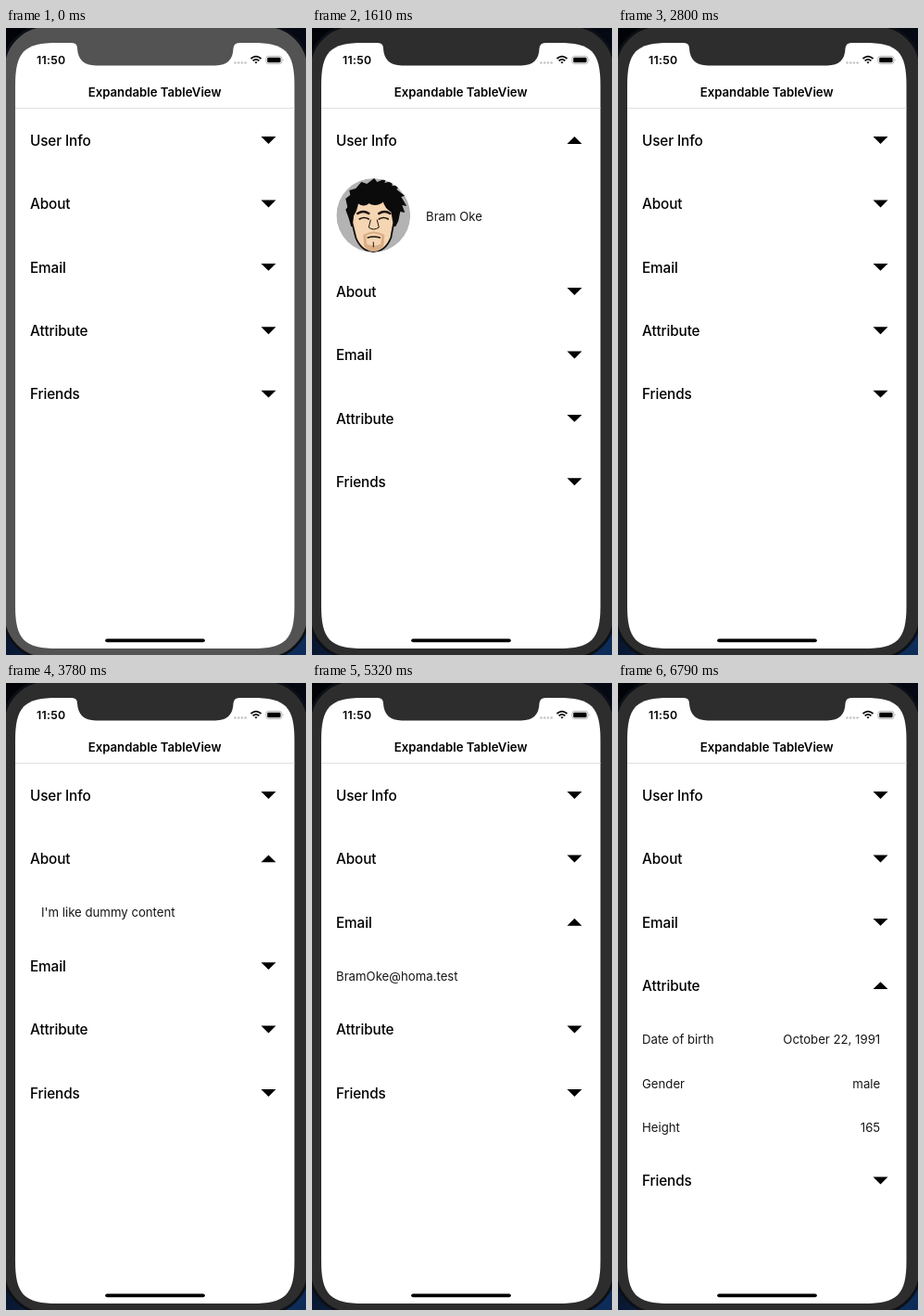
Recreate the animation shown at these times as an HTML page. Size 324 by 676 pixels, loop 7420 ms.

```html
<!DOCTYPE html>
<html lang="en">
<head>
<meta charset="utf-8">
<title>Expandable TableView</title>
<style>
  html, body { margin: 0; width: 100%; height: 100%; overflow: hidden; background: #05060d; }
  svg { display: block; }
  text { font-family: Inter, Roboto, sans-serif; }
  .header { font-size: 15.3px; font-weight: 500; letter-spacing: -.007em; }
  .detail, .title { font-size: 13.2px; }
  .detail { fill: #161616; }
  .title { font-weight: 600; text-anchor: middle; }
  .time { font-size: 12.3px; font-weight: 600; letter-spacing: .025em; }
  .end { text-anchor: end; }
</style>
</head>
<body>
<svg width="324" height="676" viewBox="0 0 324 676">
  <defs>
    <linearGradient id="desk" x2=".4" y2="1">
      <stop stop-color="#020307"/>
      <stop offset=".8" stop-color="#071022"/>
      <stop offset="1" stop-color="#0d2c58"/>
    </linearGradient>
    <clipPath id="round"><circle r="40"/></clipPath>
  </defs>
  <rect width="324" height="676" fill="url(#desk)"/>
  <g id="bezel">
    <rect x="-3" y="-3" width="330" height="683" rx="48" stroke="#0c0f16" stroke-width="3"/>
    <path fill="#fff" d="M10 62C10 25.5 19.5 16 56 16H265.5C302 16 311.5 25.5 311.5 62
      V623C311.5 659.5 302 669 265.5 669H56C19.5 669 10 659.5 10 623Z"/>
    <path d="M71 15.5V16Q77 16 77 22Q78 40.4 97 40.4H226Q245 40.4 245.5 22Q246 16 252 16V15.5Z"/>
  </g>

  <text class="time" x="33" y="38.8">11:50</text>
  <g fill="#c4c4c4">
    <circle cx="247.5" cy="37.5" r="1.3"/><circle cx="251.2" cy="37.5" r="1.3"/>
    <circle cx="254.9" cy="37.5" r="1.3"/><circle cx="258.6" cy="37.5" r="1.3"/>
  </g>
  <g fill="none" stroke="#000" stroke-width="1.7">
    <path d="M264.5 33Q270 28.2 275.5 33M266.6 35.3Q270 32.3 273.4 35.3"/>
    <path d="M268.4 36.8Q270 35.6 271.6 36.8L270 38.5Z" fill="#000" stroke="none"/>
  </g>
  <rect x="280.9" y="30.4" width="17" height="8.2" rx="2.4" fill="none" stroke="#a5a5a5" stroke-width=".8"/>
  <rect x="282.2" y="31.7" width="14.4" height="5.6" rx="1.3"/>
  <path d="M298.9 33.1Q300.4 34.5 298.9 35.9Z" fill="#a5a5a5"/>

  <text class="title" x="160.6" y="73.9">Expandable TableView</text>
  <path d="M10 86.5H311.5" stroke="#e0e0e0"/>
  <g id="table"></g>
  <rect x="107.2" y="658.4" width="107.6" height="3.9" rx="1.95"/>
</svg>
<script>
const LOOP = 7420, STEP = 70, SLIDE = 300;
const FIRST = 121, PITCH = 68.4, ROW = 47.3;

const detail = (x, y, text, end = "") =>
  `<text class="detail ${end}" x="${x}" y="${y + 5.2}">${text}</text>`;

const avatar = `
  <g transform="translate(66.3 ${ROW - .5})" clip-path="url(#round)">
    <circle r="40" fill="#b3b3b3"/>
    <path fill="#0b0b0b" d="M-24 12L-27 2L-30-6L-28-9L-30-18L-25-22L-26-27L-19-29L-13-36L-7-34L1-40
      L4-36L14-40L12-35L21-37L20-32L29-32L25-28L34-21L30-20L36-10L31-11L34-3L29-4L27 6L24 12Z"/>
    <path fill="#f5d5b2" stroke="#0b0b0b" stroke-width="1.8" d="M-22 0Q-18-6-17-14Q-10-9-5-14Q3-9 11-16
      Q13-8 20-4L22 8L19 24Q13 39 0 39Q-13 39-19 24L-23 8Z"/>
    <path fill="#d9ae86" d="M-11 21Q0 14 12 21L11 33Q7 39 0 39Q-7 39-10 33Z"/>
    <path fill="#f5d5b2" d="M-8 22Q0 17 9 22L8 31Q0 34-7 31Z"/>
    <g fill="none" stroke="#1c120d" stroke-linecap="round">
      <path stroke-width="2.6" d="M-17-2Q-11-6-5-2M6-2Q12-6 18-2"/>
      <path stroke-width="1.6" d="M-15 4Q-10 1-5 4M6 4Q11 1 16 4M-6 24Q0 22 7 24"/>
      <path d="M-3 5L-5 13Q0 17 6 13L4 5M0 29V34"/>
    </g>
  </g>`;

// Each section opens and, where "close" is given, closes again.
const sections = [
  { name: "User Info", rows: 2, open: 1290, close: 2340,
    content: avatar + detail(123, ROW, "Bram Oke") },
  { name: "About", rows: 1, open: 3460, close: 4230,
    content: detail(38, ROW / 2, "I'm like dummy content") },
  { name: "Email", rows: 1, open: 5000, close: 5770,
    content: detail(26, ROW / 2, "BramOke@homa.test") },
  { name: "Attribute", rows: 3, open: 6470,
    content: [["Date of birth", "October 22, 1991"], ["Gender", "male"], ["Height", "165"]]
      .map(([key, value], i) => {
        const y = ROW * (i + .5);
        return detail(26, y, key) + detail(283.2, y, value, "end");
      }).join("") },
  { name: "Friends", rows: 0, content: "" }
];

const table = document.getElementById("table");
const bezel = document.getElementById("bezel");

table.innerHTML = sections.map(s => `
  <g>
    <text class="header" x="26" y="5.7">${s.name}</text>
    <path class="arrow" d="M-8-3.9H8L0 4Z"/>
    <svg class="content" y="${PITCH / 2}" width="324" height="0" overflow="hidden">${s.content}</svg>
  </g>`).join("");

sections.forEach((s, i) => {
  s.group = table.children[i];
  s.arrow = s.group.querySelector(".arrow");
  s.body = s.group.querySelector(".content");
});

function ease(t, start) {
  const p = Math.min(1, Math.max(0, (t - start) / SLIDE));
  return p * p * (3 - 2 * p);
}

function draw(now) {
  const t = Math.floor(now % LOOP / STEP) * STEP;
  bezel.setAttribute("fill", t < 1120 ? "#535353" : t < 1190 ? "#3f3f3f" : "#2d2d2d");

  let y = FIRST;
  for (const s of sections) {
    const p = s.rows ? ease(t, s.open) - (s.close ? ease(t, s.close) : 0) : 0;
    const height = s.rows * ROW * p;
    s.group.setAttribute("transform", `translate(0 ${y})`);
    s.arrow.setAttribute("transform", `translate(283.5 0) rotate(${180 * p})`);
    s.body.setAttribute("height", height);
    s.body.setAttribute("opacity", p);
    s.body.setAttribute("visibility", p > 0 ? "visible" : "hidden");
    y += PITCH + height;
  }
}

const start = performance.now();
function frame() {
  draw(performance.now() - start);
  requestAnimationFrame(frame);
}
frame();
</script>
</body>
</html>
```
